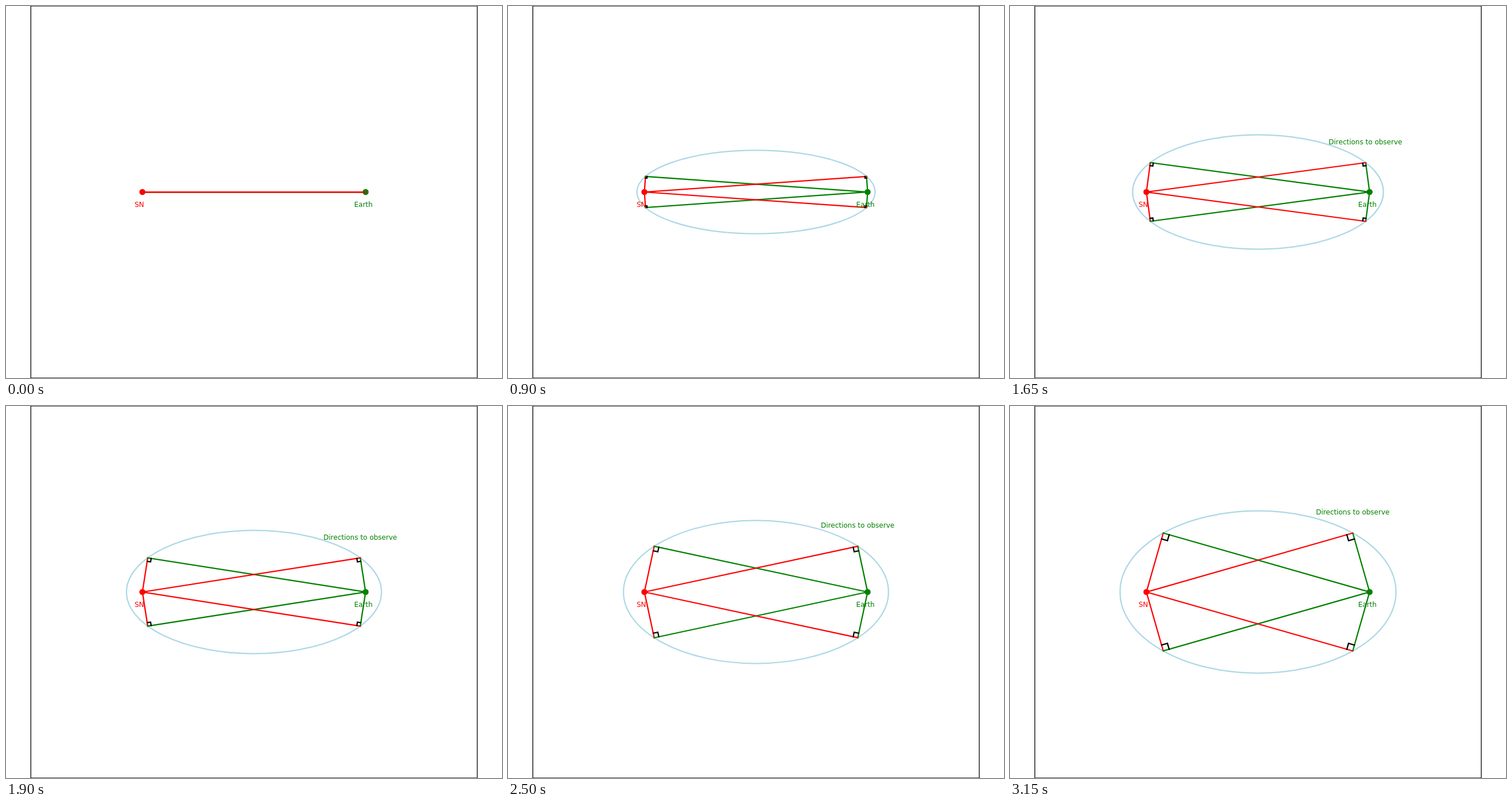
Recreate the animation shown at these times as an HTML page with a canvas. Size 864 px wide and 648 px high, loop 8000 ms.

```html
<!DOCTYPE html>
<html lang="en">
<head>
<meta charset="utf-8">
<title>Light echo directions</title>
<style>
  html, body { margin: 0; width: 100%; height: 100%; overflow: hidden; background: #fff; }
  canvas { display: block; }
</style>
</head>
<body>
<canvas id="stage" width="864" height="648"></canvas>
<script>
const ctx = document.getElementById('stage').getContext('2d');
const LOOP = 8000, STEP = 50, LAST = 63, LABEL_FROM = 28;
const CX = 432, CY = 324, C = 194.4;
const SN = [CX - C, CY], EARTH = [CX + C, CY];
const RED = '#f00', GREEN = '#008000';

function line(color, ...points) {
  ctx.strokeStyle = color;
  ctx.beginPath();
  points.forEach(p => ctx.lineTo(...p));
  ctx.stroke();
}

function dot(color, [x, y]) {
  ctx.fillStyle = color;
  ctx.beginPath();
  ctx.arc(x, y, 5.3, 0, 2 * Math.PI);
  ctx.fill();
}

function label(color, text, x, y) {
  ctx.fillStyle = color;
  ctx.fillText(text, x, y);
}

// Square of a tenth of the short leg, marking the right angle at p.
function rightAngle(p, near, far) {
  const size = 0.1 * Math.hypot(near[0] - p[0], near[1] - p[1]);
  const toward = q => {
    const d = Math.hypot(q[0] - p[0], q[1] - p[1]);
    return [(q[0] - p[0]) / d * size, (q[1] - p[1]) / d * size];
  };
  const u = toward(near), v = toward(far);
  line('#000',
    [p[0] + u[0], p[1] + u[1]],
    [p[0] + u[0] + v[0], p[1] + u[1] + v[1]],
    [p[0] + v[0], p[1] + v[1]]);
}

function draw(n) {
  // The ellipse keeps its foci while its long axis grows evenly.
  const a = C * (1 + 0.00375 * n);
  const b = Math.sqrt(a * a - C * C);
  // Where the ellipse meets the circle through both foci, the legs are perpendicular.
  const y = b * b / C;
  const x = Math.sqrt(C * C - y * y);
  const left = [[CX - x, CY - y], [CX - x, CY + y]];
  const right = [[CX + x, CY - y], [CX + x, CY + y]];

  ctx.fillStyle = '#fff';
  ctx.fillRect(0, 0, 864, 648);
  ctx.lineWidth = 2.25;
  ctx.lineCap = 'square';

  dot(RED, SN);
  dot(GREEN, EARTH);

  if (n > 0) {
    ctx.strokeStyle = '#add8e6';
    ctx.beginPath();
    ctx.ellipse(CX, CY, a, b, 0, 0, 2 * Math.PI);
    ctx.stroke();
    left.forEach(p => line(RED, SN, p));
    right.forEach(p => line(GREEN, EARTH, p));
  }
  left.forEach(p => line(GREEN, p, EARTH));
  right.forEach(p => line(RED, SN, p));
  if (n > 0) {
    left.forEach(p => rightAngle(p, SN, EARTH));
    right.forEach(p => rightAngle(p, EARTH, SN));
  }

  ctx.lineWidth = 1.3;
  ctx.strokeStyle = '#000';
  ctx.strokeRect(43.3, 0, 777.6, 648);

  ctx.font = '12px "DejaVu Sans", sans-serif';
  label(RED, 'SN', 224, 350);
  label(GREEN, 'Earth', 606.5, 350);
  if (n >= LABEL_FROM) {
    label(GREEN, 'Directions to observe', Math.round(CX + x - 64.5), Math.round(CY - y - 32));
  }
}

const start = performance.now();
function tick() {
  const t = (performance.now() - start) % LOOP;
  draw(Math.min(LAST, Math.floor(t / STEP)));
  requestAnimationFrame(tick);
}
tick();
</script>
</body>
</html>
```
